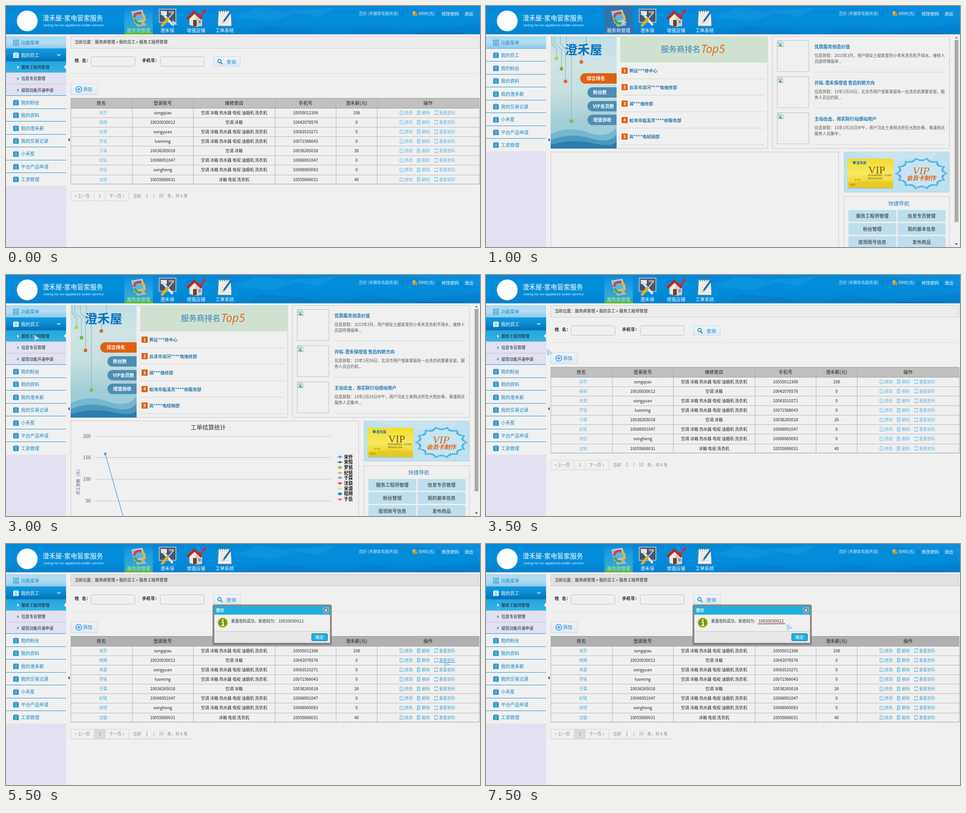
These frames come from a looping animation (1049 px wide and 534 px high, 8 s). An HTML page:

```html
<!DOCTYPE html>
<html lang="zh-CN">
<head>
<meta charset="utf-8">
<title>家电管家服务</title>
<style>
html, body { margin: 0; width: 100%; height: 100%; overflow: hidden; background: #f0f0f0; }
svg { display: block; width: 1049px; height: 534px; }
text { font-family: "Noto Sans CJK SC", "Noto Sans CJK", "Noto Sans", sans-serif; }
.off { display: none; }
.latin { font-family: "Liberation Sans", sans-serif; }
.serif { font-family: "Liberation Serif", serif; }
.hand { font-family: "Open Sans", sans-serif; font-style: italic; }
.crumb { fill: #ececec; }
.head { fill: #c0c0c0; }
.link { color: #5fb4e8; }
.dim .crumb { fill: #e1e1e1; }
.dim .head { fill: #b0b0b0; }
.dim .link { color: #45a4dc; }
.pageOn { display: none; }
.dim .pageOn { display: inline; }
</style>
</head>
<body>
<svg id="stage" viewBox="0 0 1049 534"></svg>
<script>
const MID = ' text-anchor="middle"', END = ' text-anchor="end"', BOLD = ' font-weight="700"';
const BLUE = '#1585c6', LINE = '#c8c8c8', ORANGE = '#e06010';

const rect = (x, y, w, h, fill, o = '') =>
  `<rect x="${x}" y="${y}" width="${w}" height="${h}" fill="${fill}" ${o}/>`;
const box = (x, y, w, h, fill, stroke, o = '') =>
  rect(x + .5, y + .5, w - 1, h - 1, fill, `stroke="${stroke}" ${o}`);
const line = (x1, y1, x2, y2, c, o = '') =>
  `<path d="M${x1} ${y1}L${x2} ${y2}" stroke="${c}" fill="none" ${o}/>`;
const path = (d, fill, o = '') => `<path d="${d}" fill="${fill}" ${o}/>`;
const stroke = (d, c, w = 1, o = '') =>
  path(d, 'none', `stroke="${c}" stroke-width="${w}" ${o}`);
const dot = (x, y, r, fill, o = '') => `<circle cx="${x}" cy="${y}" r="${r}" fill="${fill}" ${o}/>`;
// y is the middle of the text line
const text = (x, y, s, size, fill, o = '') =>
  `<text x="${x}" y="${(y + size * .37).toFixed(2)}" font-size="${size}" fill="${fill}" ${o}>${s}</text>`;
const group = (id, body, o = '') => `<g id="${id}" ${o}>${body}</g>`;
const at = (x, y, body) => `<g transform="translate(${x} ${y})">${body}</g>`;
const grad = (id, ...cs) => `<linearGradient id="${id}" x2="0" y2="1">` +
  cs.map((c, i) => `<stop offset="${i / (cs.length - 1)}" stop-color="${c}"/>`).join('') + '</linearGradient>';
const each = (list, f) => list.map(f).join('');

const defs = '<defs>' +
  grad('gHead', '#0387d6', '#038edb', '#038bd9', '#0380cf') +
  grad('gTab', '#0c86d6', '#1b9ce2', '#2fa6d8', '#35a6b4') +
  grad('gMenu', '#a9daf0', '#b4def2', '#8cc8ec') +
  grad('gOpen', '#109be0', '#0a8ad0', '#0470b6') +
  grad('gSel', '#25a5dc', '#35b3e4') +
  grad('gBtn', '#f1f4f8', '#dfe9f6') +
  grad('gBan', '#bfdfe8', '#cfe4e4', '#c6dfdf', '#a5cdd8', '#86bace') +
  grad('gCard', '#f3dc2c', '#f6e860', '#eccf1c') +
  '<pattern id="dots" width="4" height="4" patternUnits="userSpaceOnUse"><rect width="2" height="2" fill="#fff" opacity=".5"/></pattern>' +
  '</defs>';

function navIcons() {
  return at(275, 8,
      path('M2 4L27 0L35 25L9 31Z', '#c9d2d8', 'stroke="#7d8a94"') +
      path('M5 7L25 3L31 22L10 27Z', '#5bb4e8') +
      path('M12 31L30 27L36 35L15 38Z', '#aab4bb') +
      stroke('M9 18A10 10 0 0 1 24 9', '#e03c2c', 5) +
      stroke('M26 10A10 10 0 0 1 27 27', '#f0b820', 5) +
      stroke('M24 30A11 11 0 0 1 10 21', '#49a832', 5)) +
    at(338, 6,
      rect(1, 1, 37, 29, '#46586a', 'stroke="#aebbc6" stroke-width="2"') +
      rect(5, 5, 13, 9, '#dfe8ee') + rect(22, 5, 12, 5, '#8ca0b0') +
      stroke('M9 11L31 36', '#dfe3e6', 5) + stroke('M5 5L11 12M5 13L12 8', '#dfe3e6', 4) +
      stroke('M33 8L20 23', '#c8ced2', 2.5) + stroke('M19 23L8 37', '#e8b020', 6, 'stroke-linecap="round"')) +
    at(399, 7,
      path('M7 20L21 8L35 21V37L21 39L7 35Z', '#eeeae4') + path('M21 12L35 21V37L21 39Z', '#d4cdc5') +
      path('M0 20L17 3L36 20L32 23L18 10L5 23Z', '#c02418') +
      rect(15, 24, 8, 14, '#784028') + rect(27, 25, 5, 6, '#6b98b8') +
      stroke('M27 13L33 15L40 4', '#d22a20', 3) + path('M36 4L43 0L43 9Z', '#d22a20')) +
    at(468, 7,
      path('M3 4H29L31 37H1Z', '#f4f4f0', 'stroke="#a8b0b8"') +
      each([10, 15, 20, 25, 30], y => line(6, y, 27, y, '#b8c4cc')) +
      each([6, 11, 16, 21, 26], x => line(x, 1, x, 7, '#58646e', 'stroke-width="1.5"')) +
      stroke('M30 5L14 27', '#2268b4', 4) + path('M12 25L16 28L10 33Z', '#d8b078'));
}

function header() {
  const soft = 'opacity=".16"';
  return rect(0, 0, 1049, 62.5, 'url(#gHead)') +
    path('M505 24L560 2L640 16L590 34Z', '#3cb4f0', soft) +
    path('M620 12L735 3L690 24Z', '#4cc0f4', soft) +
    path('M535 62L562 43L660 50L700 62Z', '#0060ac', soft) +
    path('M740 62L800 44L880 56L1049 40V62Z', '#0064b0', soft) +
    path('M880 0H1049V24L960 14Z', '#30aaec', soft) +
    line(907, 61, 1012, 61, '#04589c') + line(0, 62.5, 1049, 62.5, '#4a9ed0') +
    dot(47, 33, 23, '#fff') +
    text(81, 27, '澄禾屋-家电管家服务', 14.3, '#fff') +
    text(83, 42, 'cheng he wu appliance butler service', 8.1, '#e4f4ff', 'class="latin"') +
    group('tabOn', rect(262, 0, 63, 62, 'url(#gTab)') + rect(262, 59.5, 63, 3, '#6cc800')) +
    group('tabHover', rect(262, 0, 63, 62, '#2f74ae')) +
    navIcons() +
    group('tabText', text(293.5, 54, '服务商管理', 10.3, 'currentColor', MID)) +
    text(357, 54, '澄禾保', 10.3, '#fff', MID) + text(420.5, 54, '增值店铺', 10.3, '#fff', MID) +
    text(484, 54, '工单系统', 10.3, '#fff', MID) +
    text(781, 17, '您好 [禾穗家电服务部]', 8.9, '#c8e8fb') +
    each([877.5, 956.5, 1008.5], x => line(x, 12, x, 22, '#0564ac')) +
    path('M900 12H906V21H900Z', '#f0c040') + path('M904 16H910V22H901V18Z', '#e08a28') +
    text(913, 17, '5995(元)', 9.2, '#fff') + text(964, 17, '修改密码', 9.6, '#fff') +
    text(1015, 17, '退出', 9.6, '#fff');
}

const note = (x, y, c) => rect(x, y - 5, 12, 11, c) +
  each([2, 5, 8], d => line(x + d + 1, y - 7, x + d + 1, y - 3, c)) +
  each([-2, 1, 4], d => line(x + 2.5, y + d - .5, x + 9.5, y + d - .5, c === '#fff' ? '#0a86cc' : '#f0f0f0'));

const menu = ['我的粉丝', '我的资料', '我的澄禾薪', '我的交易记录', '小禾星', '平台产品申请', '工资管理'];
const subs = ['服务工程师管理', '信息专员管理', '提现功能开通申请'];

function sidebar() {
  const sub = rect(0, 122, 133, 80, '#e1e1f1') +
    group('subSel', rect(0, 122, 133, 25.5, 'url(#gSel)') + path('M133 130L128 135L133 140Z', '#f0f0f0')) +
    each(subs, (s, i) => {
      const y = 135 + 25.5 * i;
      return path(`M25 ${y - 3}l3.5 3.5l-3.5 3.5z`, i ? '#2784c4' : 'currentColor') + text(34, y + .5, s, 8.9, '#161c28') +
        line(0, y + 12.8, 133, y + 12.8, '#bfbfd2');
    });
  const rest = rect(0, 123, 133, 199, '#f0f0f0') + line(0, 122.5, 133, 122.5, '#1c97cf') +
    each(menu, (s, i) => {
      const y = 138 + 28.4 * i, edge = Math.round(y + 13) + .5;
      return note(16, Math.round(y), BLUE) + text(33, y, s, 10.2, BLUE) +
        (i < 6 ? line(0, edge, 133, edge, '#1c97cf') : '');
    });
  return rect(0, 63, 133, 471, '#e1e1f1') + rect(0, 63, 133, 4, '#f0f0f0') +
    rect(0, 67, 133, 27, 'url(#gMenu)') + line(0, 94.5, 133, 94.5, '#6db9e2') +
    each([[16, 75], [23, 75], [16, 82], [23, 82]], p => box(p[0], p[1], 5.5, 5.5, 'none', BLUE)) +
    text(33, 81, '功能菜单', 10.2, BLUE) +
    group('itemOff', rect(0, 95, 133, 28, '#f0f0f0') + note(16, 109, BLUE) + text(33, 109.5, '我的员工', 10.2, BLUE)) +
    group('sub', sub) +
    group('itemOn', rect(0, 94, 133, 28.5, 'url(#gOpen)') + note(16, 109, '#fff') +
      text(33, 109.5, '我的员工', 10.2, '#fff') + stroke('M113 106.5L116.7 110L120.4 106.5', '#fff', 1.5)) +
    group('rest', rest) + path('M137 296.5L141 292.5V300.5Z', '#4a4a78');
}

function ranking() {
  const wires = [[146, 156, 116, '#b4d24a'], [152, 167, 139, '#6cb848'], [165, 176, 167, '#e06428'],
    [222, 211, 124, '#e06428'], [178, 189, 255, '#7cc040']];
  const tabs = [['粉丝数', 252], ['VIP会员数', 260], ['增值创收', 257]];
  const shops = ['霁远***修中心', '云泽市滨河****电维修部', '澜***维修部', '松湾市临溪灵****修服务部', '岚****电经销部'];
  return box(143, 67, 481, 249, 'none', LINE) + rect(143, 67, 146, 249, 'url(#gBan)') +
    path('M143 268Q175 246 215 262T289 250V316H143Z', '#9fd0dc', 'opacity=".8"') +
    path('M143 284Q180 264 225 280T289 268V316H143Z', '#6cb2cc', 'opacity=".8"') +
    path('M143 297Q185 280 230 293T289 284V316H143Z', '#4796bf', 'opacity=".9"') +
    path('M143 308Q190 294 235 304T289 300V316H143Z', '#2c7cac') +
    each(wires, ([a, b, y, c]) => stroke(`M${a} 67V84L${b} 96V${y}`, '#8fb3ba', 1.2) + dot(b, y, 4, c)) +
    text(216, 97, '澄禾屋', 27.5, '#0c70c0', MID + BOLD) +
    path('M289 149H220a11.5 11.5 0 0 0 0 23H289Z', ORANGE) + text(243, 160.5, '综合排名', 10.2, '#fff', MID + BOLD) +
    each(tabs, ([s, x], i) => path(`M289 ${180 + 30.4 * i}h-53a11.5 11.5 0 0 0 0 23h53z`, '#4d8db2') +
      text(x, 191.5 + 30.4 * i, s, 10.2, '#fff', MID + BOLD)) +
    rect(297, 67, 327, 58, '#d0e1d0') + text(387, 96, '服务商排名', 17.5, '#3080b4') +
    text(476, 94.5, 'Top5', 25, '#e06818', 'class="hand"') +
    each(shops, (s, i) => {
      const y = 143.3 + 36.5 * i, edge = Math.floor(y + 18) + .5;
      return rect(300, y - 6.8, 13.5, 13.5, ORANGE) + text(306.8, y, i + 1, 9.5, '#fff', MID + BOLD) +
        text(317, y + .4, s, 9.6, '#2878a8', BOLD) +
        line(297, edge, 616, edge, '#b4b4b4', 'stroke-dasharray="1 1"');
    });
}

function news() {
  const items = [
    ['优质服务创造价值', '信息获取：2015年3月，用户顾女士报家里的小青禾洗衣机不排水，维修人', '员邵师傅接单...'],
    ['开拓-澄禾保增值 售后的新方向', '信息获取：15年1月26日，北京市用户邹某某报有一台洗衣机需要安装，服', '务人员应约前...'],
    ['主动出击，用实际行动感动用户', '信息获取：15年1月25日中午，用户冯女士来网点所在大院办事，事逢网点', '服务人员集中...']];
  return box(633, 67, 393, 249, 'none', LINE) + each(items, ([h, a, b], i) => at(0, Math.floor(80.4 * i),
    box(644, 76, 71, 70, 'none', '#bdbdbd') +
    path('M646 78H655L658 81V90H646Z', '#fff', 'stroke="#98a0a8" stroke-width=".8"') +
    rect(647, 80, 9, 5, '#a8cdf0') + path('M647 89L651 84L657 89Z', '#4ca848') +
    text(727, 90.5, h, 9.8, '#2079b4', BOLD) + text(727, 110, a, 8.8, '#555') + text(727, 123, b, 8.8, '#555') +
    line(727, 146.5, 1016, 146.5, '#b4b4b4', 'stroke-dasharray="1 1"')));
}

function chart() {
  const marks = { c: 'M-3 0a3 3 0 1 0 6 0a3 3 0 1 0 -6 0', d: 'M0-3L3 0L0 3L-3 0Z', s: 'M-3-3H3V3H-3Z', t: 'M0-3L3 3H-3Z', v: 'M0 3L3-3H-3Z' };
  const rows = [['宋乔', '#5aa2e0', 'c'], ['宋恒', '#4a5454', 'd'], ['罗铭', '#80cc58', 's'], ['纪铭', '#dca060', 't'],
    ['于霖', '#7a88d4', 'v'], ['沈骁', '#e8505c', 'c'], ['宋源', '#e4d84c', 'd'], ['程朔', '#2b80b0', 's'], ['于岳', '#ec5a60', 't']];
  return text(447.5, 337, '工单结算统计', 13, '#333', MID) +
    each([200, 150, 100, 50], (v, i) => {
      const y = Math.floor(358 + 47.7 * i) - .5;
      return line(198, y, 718, y, '#c2c2c2') + text(187.5, y, v, 10.2, '#555', END);
    }) +
    `<g transform="translate(160 456) rotate(-90)">${text(0, 0, '月工资数（元）', 8.9, '#4d5490', MID)}</g>` +
    line(219.5, 396, 259.5, 536, '#5aa0e0', 'stroke-width="1.4"') + dot(219.5, 396.5, 3, '#5aa0e0') +
    each(rows, ([s, c, m], i) => at(739, 403 + 11.7 * i,
      line(-6, 0, 6, 0, c, 'stroke-width="1.4"') + path(marks[m], c) + text(9, 0, s, 9.7, '#111', BOLD)));
}

function burst(rx, ry, n) {
  const p = (a, k) => `${(963.5 + Math.cos(a) * rx * k).toFixed(1)} ${(371 + Math.sin(a) * ry * k).toFixed(1)}`;
  const step = 2 * Math.PI / n;
  let d = 'M' + p(0, 1);
  for (let i = 0; i < n; i++) d += `Q${p((i + .5) * step, .74)} ${p((i + 1) * step, 1)}`;
  return d + 'Z';
}

function side() {
  const quick = ['服务工程师管理', '信息专员管理', '粉丝管理', '我的基本信息', '提现账号信息', '发布商品'];
  return box(792, 323, 234, 90, '#bfe0ee', '#b0d0e0') +
    path('M812 324H1000L985 342L940 338L900 346L850 332Z', 'url(#dots)') +
    rect(801, 400, 100, 5, '#7c9cac', 'opacity=".4" rx="2"') +
    path('M802 338L898 338Q902 338 902 342L900 402Q900 404 897 404L803 402Q800 402 800 399V341Q800 338 802 338Z', 'url(#gCard)') +
    path('M800 392Q850 384 901 390L900 404L803 402Z', '#dcbc14', 'opacity=".45"') +
    dot(815, 347, 3.4, '#2b80c0') + text(819.5, 347, '澄禾屋', 7.4, '#1d70a8', BOLD) +
    text(864.5, 362.5, 'VIP', 23, '#80500c', MID + ' class="serif"') +
    text(845, 376, '尊享家电维修保养，会员专属', 4, '#664404') + text(845, 383, '服务热线会员专用', 4, '#664404') +
    text(822, 386, '扫一扫', 4, '#664404', MID) + text(806, 397, '会员卡', 4, '#664404') +
    path(burst(59, 36, 14), '#58b4e2') + path(burst(53, 31.5, 14), '#c6e5f3') +
    text(963, 364, 'VIP', 24, '#e06018', MID + ' font-style="italic" class="serif"') +
    text(963, 381, '会员卡制作', 13, '#e06018', MID + BOLD + ' font-style="italic"') +
    box(792, 422, 234, 130, 'none', LINE) + text(913.5, 438, '快捷导航', 11.8, '#3080b4', MID) +
    each(quick, (s, i) => {
      const x = 802 + 109 * (i % 2), y = 452 + 29 * (i >> 1);
      return rect(x, y, 106, 26, '#bddeed') + text(x + 53, y + 13, s, 10.3, '#222', MID);
    }) +
    rect(1037, 75, 8.5, 404, '#aaa') + path('M1038 71.5L1041 68L1044 71.5Z', '#666') + path('M1038 526L1041 529.5L1044 526Z', '#444');
}

const ALL = '空调 冰箱 热水器 电视 油烟机 洗衣机', COOL = '空调 冰箱';
const staff = [
  ['宋乔', 'songqiao', ALL, '10055012306', 108], ['程朔', '10020030012', COOL, '10042076576', 0],
  ['宋源', 'songyuan', ALL, '10063510271', 0], ['罗铭', 'luoming', ALL, '10071568043', 0],
  ['于霖', '10036265018', COOL, '10036265018', 26], ['纪铭', '10086951047', ALL, '10086951047', 0],
  ['宋恒', 'songheng', ALL, '10086965093', 0], ['沈骁', '10055869031', '冰箱 电视 洗衣机', '10055869031', 40]];
const cols = [143, 279, 414.5, 595, 730.5, 821, 1047];
const mid = i => (cols[i] + cols[i + 1]) / 2;

function ops(y) {
  const c = 'currentColor';
  return stroke(`M877 ${y - 4}h-5v8h8v-4M875 ${y + 1}l5 -5`, c) +
    stroke(`M909 ${y - 3}h8M911 ${y - 3}v-1.5h4v1.5M910 ${y - 2}v6.5h6v-6.5M912 ${y - 1}v4M914 ${y - 1}v4`, c, .9) +
    stroke(`M948 ${y - 1}a4 4 0 0 1 7.4 -1.4v-2M956 ${y + 1}a4 4 0 0 1 -7.4 1.4v2`, c, 1.1) +
    text(882, y, '修改', 9.1, c) + text(920, y, '删除', 9.1, c) + text(958.5, y, '重置密码', 8.9, c);
}

function table() {
  const heads = ['姓名', '登录账号', '维修类目', '手机号', '澄禾薪(元)', '操作'];
  const grey = '#8a8a8a';
  return rect(143.5, 67.5, 903, 26, '#ececec', 'class="crumb" stroke="#cbcbcb"') +
    text(152, 80, '当前位置：服务商管理 &gt; 我的员工 &gt; 服务工程师管理', 8.95, '#222') +
    text(152, 120, '姓', 9.6, '#222', BOLD) + text(168, 120, '名：', 9.6, '#222', BOLD) +
    text(301, 120, '手机号：', 9.6, '#222', BOLD) +
    box(188, 112, 98, 22, '#f0f0f0', '#bababa', 'rx="3"') + box(341, 112, 98, 22, '#f0f0f0', '#bababa', 'rx="3"') +
    box(459, 112, 60, 22, 'url(#gBtn)', '#c4d6ea') + dot(472.5, 122, 3.6, 'none', `stroke="${BLUE}" stroke-width="1.7"`) +
    line(475, 125, 479, 129, BLUE, 'stroke-width="2"') + text(488, 124, '查询', 10.4, BLUE) +
    line(143, 149.5, 1047, 149.5, '#dcdcdc') +
    box(143, 172, 60, 25, 'url(#gBtn)', '#c4d6ea') + dot(161, 184.5, 6.4, 'none', `stroke="${BLUE}" stroke-width="1.4"`) +
    stroke('M157.5 184.5H164.5M161 181V188', BLUE, 1.4) + text(170, 184.5, '添加', 10.4, BLUE) +
    rect(143, 205, 904, 21, '#c0c0c0', 'class="head"') +
    each(heads, (s, i) => text(mid(i), 215.5, s, 10.2, '#222', MID)) +
    each(staff, (r, i) => {
      const y = 236.3 + 21.13 * i, edge = Math.round(y - 10.6) + .5;
      return line(143, edge, 1047, edge, '#b6b6b6') +
        `<g class="link">${text(mid(0) + 4, y, r[0], 8.9, 'currentColor', MID)}${ops(y)}</g>` +
        each(r.slice(1), (s, j) => text(mid(j + 1), y, s, 9.1, '#222', MID));
    }) +
    each(cols, x => line(Math.floor(x) + .5, 205, Math.floor(x) + .5, 395, '#b0b0b0')) +
    stroke('M143 204.5H1047M143 226.5H1047M143 394.5H1047', '#999') +
    group('hover', line(958, 0, 994, 0, '#3a9cd8')) +
    `<g class="pageOn">${rect(144, 431, 268, 1.5, '#d4d4d4') + rect(196, 410, 23, 22, '#dadada') +
      box(301, 413, 22, 15, '#f4f4f4', '#ddd') + box(333, 413, 22, 15, '#f4f4f4', '#ddd')}</g>` +
    box(143, 410, 129, 22, 'none', '#d2d2d2') + stroke('M195.5 410V432M219.5 410V432', '#d2d2d2') +
    text(152, 420.5, '« 上一页', 9.1, grey) + text(207.5, 420.5, '1', 9.5, grey, MID) + text(228, 420.5, '下一页 »', 9.1, grey) +
    text(281, 420.5, '当前', 9, grey) + text(312, 420.5, '1', 10, grey, MID) + text(327.5, 420.5, '/', 10, grey, MID) +
    text(343.5, 420.5, '10', 10, grey, MID) + text(357, 420.5, '条，共 8 条', 9, grey);
}

function dialog() {
  return rect(457, 134, 264, 90, '#808080', 'rx="4" opacity=".92"') +
    rect(461, 138, 256, 81, '#f0f0f0') + rect(461, 138, 256, 18.5, '#22aedf') +
    text(465, 147, '提示', 9, '#fff', BOLD) + box(702, 141, 12, 12, '#6e7c84', '#c8dce4', 'rx="1.5"') +
    stroke('M705.5 144.5L710.5 149.5M710.5 144.5L705.5 149.5', '#fff', 1.5) +
    rect(461, 193, 256, 26, '#e8e8e8') + line(461, 193.5, 717, 193.5, '#c8c8c8') +
    dot(479.7, 174.3, 10.6, '#76980c', 'stroke="#c3d44c" stroke-width="2"') +
    dot(479.7, 169, 1.9, '#fff') + stroke('M477 173H480.5V180M476.6 180.3H483', '#fff', 2.2) +
    text(498, 170.5, '重置密码成功，新密码为：', 8.7, '#333') + text(603, 170.5, '10020030012', 9.1, '#333') +
    box(676, 198, 36, 17, '#22aedf', '#1a6f90', 'rx="2"') + text(694, 206.5, '确定', 9.2, '#fff', MID);
}

const stage = document.getElementById('stage');
stage.innerHTML = defs + rect(0, 0, 1049, 534, '#f0f0f0') +
  group('home', ranking() + news() + box(143, 323, 638, 240, 'none', LINE) + group('chart', chart()) + side()) +
  group('table', table()) + header() + sidebar() + group('dialog', dialog()) +
  group('mark', line(601, 177, 662, 176.5, '#d42a2a', 'stroke-width="1.6"')) +
  group('cursor', path('M.5 .5L1.5 14.5L5 10.5L11.5 9.5Z', '#bcdcf0', 'stroke="#86bce0" stroke-linejoin="round"'));

const el = id => document.getElementById(id);
const show = (id, on) => el(id).classList.toggle('off', !on);

// cursor x, y, then what differs from the plain table page
const steps = [
  [368, 31],
  [300, 28, { tab: 1 }],
  [300, 28, { tab: 1, home: 1, open: 0 }],
  [75, 114, { home: 1, chart: 1, open: 0 }],
  [83, 193, { home: 1, chart: 1, open: 64 }],
  [78, 160, { home: 1, chart: 1, open: 77 }],
  [62, 132, { home: 1, chart: 1 }],
  [135, 164],
  [979, 233, { row: 0 }],
  [977, 264, { row: 1 }],
  [970, 258, { row: 1 }],
  [970, 258, { row: 1, box: 1 }],
  [834, 242, { box: 1 }],
  [603, 182, { box: 1 }],
  [603, 171, { box: 1 }],
  [666, 177, { box: 1, mark: 1 }]];

function draw(i) {
  const [x, y, s = {}] = steps[i];
  const { open = 76, row = -1 } = s, picked = open === 76;
  el('cursor').setAttribute('transform', `translate(${x} ${y})`);
  show('home', s.home); show('chart', s.chart); show('table', !s.home);
  show('tabOn', !s.tab); show('tabHover', s.tab);
  el('tabText').style.color = s.tab ? '#fff' : '#c4f2a0';
  show('itemOn', open); show('itemOff', !open); show('sub', open); show('subSel', picked);
  el('sub').setAttribute('transform', `translate(0 ${picked ? 0 : 1})`);
  el('sub').style.color = picked ? '#fff' : '#2784c4';
  el('rest').setAttribute('transform', `translate(0 ${open})`);
  show('hover', row >= 0);
  el('hover').setAttribute('transform', `translate(0 ${241.5 + 21 * row})`);
  show('dialog', s.box); show('mark', s.mark);
  stage.classList.toggle('dim', !!s.box);
}

let last = -1;
function tick() {
  const i = Math.floor(performance.now() % 8000 / 500);
  if (i !== last) draw(last = i);
  requestAnimationFrame(tick);
}
tick();
</script>
</body>
</html>
```
